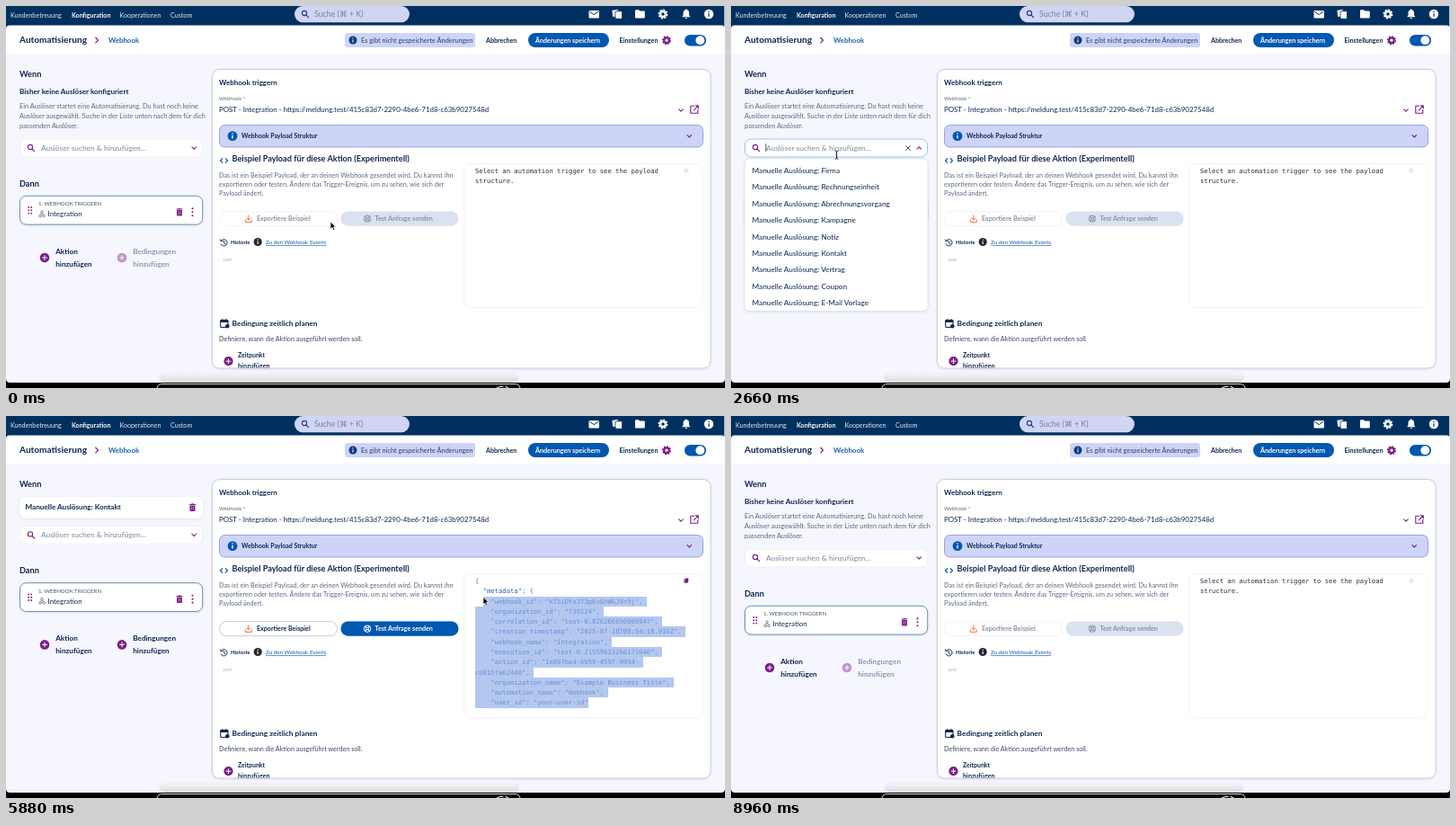
These frames come from a looping animation (800x425 px, 9030 ms). An HTML page:

```html
<!DOCTYPE html>
<html lang="de">
<head>
<meta charset="utf-8">
<title>Automatisierung</title>
<style>
  html, body { margin: 0; width: 100%; height: 100%; overflow: hidden; background: #000; }
  svg { display: block; width: 800px; height: 425px; }
  text { font-family: Lato, "Open Sans", sans-serif; }
  .mono { font-family: "DejaVu Sans Mono", "Liberation Mono", monospace; font-size: 7.21px; }
</style>
</head>
<body>
<svg id="stage" viewBox="0 0 800 425" xmlns="http://www.w3.org/2000/svg"></svg>
<script>
const LOOP = 9030, STEP = 70;
const NAVY = '#0f2650', BLUE = '#0058b0', PLUM = '#7d1f85', GREY = '#5d6880', SOFT = '#8791a6';
const CHAR = 4.34, LINE = 11.28, CODE_X = 522, CODE_TOP = 178;
const T = { open: 2520, pick: 3990, load: 4200, drag: 4970, blur: 5040, dragEnd: 5670, remove: 7210, fade: 250 };

// ---- drawing helpers ----
const text = (x, y, size, str, fill = NAVY, bold = false, extra = '') =>
  `<text x="${x}" y="${y}" font-size="${size}" fill="${fill}" ${bold ? 'font-weight="700"' : ''} ${extra}>${str}</text>`;
const box = (x, y, x2, y2, r, fill, stroke = 'none', extra = '') =>
  `<rect x="${x}" y="${y}" width="${x2 - x}" height="${y2 - y}" rx="${r}" fill="${fill}" stroke="${stroke}" ${extra}/>`;
const dot = (x, y, r, fill) => `<circle cx="${x}" cy="${y}" r="${r}" fill="${fill}"/>`;
const line = (d, color, w = 1, extra = '') =>
  `<path d="${d}" fill="none" stroke="${color}" stroke-width="${w}" stroke-linecap="round" stroke-linejoin="round" ${extra}/>`;
const group = (id, body, extra = '') => `<g id="${id}" ${extra}>${body}</g>`;

const chevron = (x, y, extra = '') => line(`M${x - 2.3} ${y - 1.2}l2.3 2.4l2.3 -2.4`, PLUM, 1.1, extra);
const lens = (x, y, c) =>
  `<circle cx="${x - 1}" cy="${y - 1}" r="2.6" fill="none" stroke="${c}" stroke-width="1.1"/>` + line(`M${x + 1} ${y + 1}l2.6 2.6`, c, 1.2);
const info = (x, y, r, c, mark = '#fff') =>
  dot(x, y, r, c) + line(`M${x} ${y - .3}v${r * .5}`, mark, r * .24) + dot(x, y - r * .48, r * .15, mark);
const plus = (x, y, r = 5.3) => dot(x, y, r, PLUM) + line(`M${x - 2.4} ${y}h4.8M${x} ${y - 2.4}v4.8`, '#fff', 1);
const trash = (x, y) =>
  `<path d="M${x - 3.4} ${y - 3.7}h2l.6 -.7h1.600l.6 .7h2v1h-6.800zM${x - 3} ${y - 2.300}h6v5.600a1 1 0 0 1 -1 1h-4a1 1 0 0 1 -1 -1z" fill="${PLUM}"/>` +
  line(`M${x - 1} ${y - .7}v3.2M${x + 1} ${y - .7}v3.2`, '#e9cbe9', .5);
const gear = (x, y, r, c) =>
  `<circle cx="${x}" cy="${y}" r="${r * .56}" fill="none" stroke="${c}" stroke-width="${r * .46}"/>
   <circle cx="${x}" cy="${y}" r="${r * .86}" fill="none" stroke="${c}" stroke-width="${r * .3}" pathLength="80" stroke-dasharray="6 4"/>`;
const wheel = (x, y, c) =>
  `<circle cx="${x}" cy="${y}" r="3.7" fill="none" stroke="${c}"/><circle cx="${x}" cy="${y}" r="1.4" fill="none" stroke="${c}" stroke-width=".9"/>` +
  line([[1, 1], [1, -1], [-1, 1], [-1, -1]].map(([a, b]) => `M${x + a} ${y + b}l${a * 1.6} ${b * 1.6}`).join(''), c, 1.1);

// ---- page content ----
const json = [
  '{', '  "metadata": {',
  '    "webhook_id": "kT5iDYx373p6v6hWGJVn9j",',
  '    "organization_id": "739224",',
  '    "correlation_id": "test-0.826366690009047",',
  '    "creation_timestamp": "2025-07-18T08:54:18.916Z",',
  '    "webhook_name": "Integration",',
  '    "execution_id": "test-0.21559623266171646",',
  '    "action_id": "1e897ba4-6b59-459f-9954-',
  'cd815fa62440",',
  '    "organization_name": "Example Business Title",',
  '    "automation_name": "Webhook",',
  '    "user_id": "your-user-id"'
];
const triggers = ['Firma', 'Rechnungseinheit', 'Abrechnungsvorgang', 'Kampagne', 'Notiz',
  'Kontakt', 'Vertrag', 'Coupon', 'E-Mail Vorlage'];
const ROW = 18.4, LIST_TOP = 174;

const mono = (str, i, fill) => {
  const pad = str.length - str.trimStart().length;
  return `<text class="mono" x="${CODE_X + pad * CHAR}" y="${186 + i * LINE}" fill="${fill}">` +
    str.trim().replace('{', '<tspan fill="#66748c">{</tspan>') + '</text>';
};

const navIcons = () => {
  const w = '#fff', n = '#00305f';
  return box(648.5, 5, 660, 13.5, 1.2, w) + line('M649.5 6.4l4.7 3.2l4.8 -3.2', n, 1) +
    box(674.5, 4, 681.5, 12, 1, w, n, 'stroke-width=".6" transform="rotate(-8 678 8)"') +
    box(678, 5.8, 685.5, 14.2, 1, w, n, 'stroke-width=".8"') +
    '<path d="M700 5.2q0-1 1-1h3l1.2 1.4h4.6q1 0 1 1v6q0 1-1 1h-8.800q-1 0-1-1z" fill="#fff"/>' +
    gear(731, 9, 5.4, w) +
    '<path d="M752.500 12.200v-.8l1-1v-2.900q0-2.700 2.500-3.300q.1-.9.800-.9t.8.900q2.500.6 2.500 3.300v2.900l1 1v.8zM755.600 12.900h2.400q-.2 1.200-1.200 1.200t-1.200-1.200z" fill="#fff"/>' +
    info(782, 9, 5.2, w, n);
};

const shell = () =>
  `<path d="M0 0H800V414.500q0 4.500-4.500 4.500H4.500Q0 419 0 414.500z" fill="#f5f6fe"/>` +
  box(170, 407, 571, 419, 9, 'url(#shade)') +
  box(0, 0, 800, 30, 0, '#00305f') + box(799, 0, 800, 30, 0, '#b4c0d2') +
  '<path d="M0 53V25.500q0-4 4-4H796q4 0 4 4V53z" fill="#fff"/>' +
  `<path d="M168 427v-1q0-5.500 6-5.500H566q6 0 6 5.500v1" fill="#080808" stroke="#dcdcdc"/>` +
  line('M546 425l4-1.500h3M556 423.500l3 1.500', '#ddd', 1.2) +
  text(5, 12.5, 7.18, 'Kundenbetreuung', '#e3eaf3') +
  text(73, 12.5, 7.1, 'Konfiguration', '#fff', true) +
  text(126.5, 12.5, 7.05, 'Kooperationen', '#e3eaf3') +
  text(183, 12.5, 7.15, 'Custom', '#e3eaf3') +
  box(321, 0, 449, 18.2, 9.1, '#cfd5f2') +
  lens(333, 9, '#1e3f86') + text(343, 12, 8.8, 'Suche (⌘ + K)', '#7481a0') + navIcons();

const header = () =>
  text(15, 41.2, 10.1, 'Automatisierung', NAVY, true) +
  line('M99.800 35.300l2.700 2.800l-2.700 2.800', PLUM, 1.3) +
  text(114, 41, 7.87, 'Webhook', '#1a62ae', true) +
  box(377, 30, 522, 46, 3, '#cdd4f6') + info(386, 38, 4.5, '#123a7c') +
  text(395, 40.8, 7.38, 'Es gibt nicht gespeicherte Änderungen', '#2a3f6c') +
  text(534, 40.6, 7.06, 'Abbrechen', NAVY, true) +
  box(581, 30, 671, 46, 8, BLUE) + text(589, 40.6, 7.2, 'Änderungen speichern', '#fff', true) +
  text(682.5, 40.6, 7.2, 'Einstellungen', NAVY, true) + gear(735, 38.2, 5, PLUM) +
  box(755, 32, 779, 44.5, 6.2, BLUE) + dot(772.3, 38.2, 4.9, '#fff');

const intro = () =>
  text(15, 98, 8.15, 'Bisher keine Auslöser konfiguriert', NAVY, true) +
  ['Ein Auslöser startet eine Automatisierung. Du hast noch keine',
   'Auslöser ausgewählt. Suche in der Liste unten nach dem für dich',
   'passenden Auslöser.'].map((s, i) => text(15, 113.8 + i * 11.2, 7.37, s, GREY)).join('');

const chip = () =>
  box(15, 90, 219, 113.5, 6, '#fff', 'none', 'filter="url(#soft)"') +
  text(21.5, 104.3, 8.18, 'Manuelle Auslösung: Kontakt', NAVY, true) + trash(207.5, 101.7);

const steps = () => {
  let grip = '';
  for (let i = 0; i < 6; i++) grip += dot(25.2 + (i % 2) * 3, 224 + (i >> 1) * 3.3, .95, PLUM);
  const add = (x, label) => plus(x, 280) + text(x + 12.2, 275.6, 8.2, label, NAVY, true) +
    text(x + 12.2, 289.6, 8.2, 'hinzufügen', NAVY, true);
  return box(15.5, 148, 218.5, 168, 7, '#fff', '#eceef6', 'id="field" stroke-width=".9"') +
    lens(28, 158, PLUM) + text(39, 160.5, 8.38, 'Auslöser suchen &amp; hinzufügen...', '#7b879c') +
    chevron(209.2, 158, 'id="arrow"') +
    group('focus', line('M38.800 153.500v8', NAVY, .8, 'id="caret"') + line('M194.700 155.700l4.800 4.800m0 -4.800l-4.800 4.800', NAVY, .9)) +
    text(15, 200.5, 9.2, 'Dann', NAVY, true) +
    box(15.5, 211.3, 218.7, 243.1, 7, '#fff', '#6c8fb4', 'filter="url(#soft)"') + grip +
    text(36, 222.3, 6.1, '1. WEBHOOK TRIGGERN', '#43506c') +
    line('M40 229.500l-1.800 3.600M40 229.500l2 3.600M38 233.400h4', '#66718a', .8) +
    [[40, 229.3], [38, 233.4], [42.3, 233.4]].map(([x, y]) => `<circle cx="${x}" cy="${y}" r="1.3" fill="#fff" stroke="#66718a" stroke-width=".8"/>`).join('') +
    text(46.5, 234.3, 7.95, 'Integration') + trash(193, 229.3) +
    [225.4, 229.3, 233.2].map(y => dot(207.5, y, 1.05, PLUM)).join('') +
    add(43, 'Aktion') + group('conditions', add(129, 'Bedingungen'));
};

const card = () =>
  box(229.5, 70.5, 784, 403, 8, '#fff', '#c9cfdf', 'filter="url(#soft)"') +
  text(237, 88, 8, 'Webhook triggern', NAVY, true) +
  text(237, 105.2, 5.9, 'Webhook *', GREY) +
  text(237, 118, 7.9, 'POST - Integration - https://meldung.test/415c83d7-2290-4be6-71d8-c63b9027548d') +
  chevron(751, 116) +
  line('M765.500 111.300h-3.700v8h8v-3.700M767.300 110.900h3v3M770 111.200l-4.600 4.600', PLUM, 1.1) +
  box(237.5, 132.5, 775.5, 157, 6, '#cdd4f8', '#98a3de') + info(252, 144.6, 5.4, BLUE) +
  text(262, 147.1, 7.02, 'Webhook Payload Struktur', NAVY, true) + chevron(760.3, 144.8) +
  line('M240.800 169.700l-2.300 2.300l2.300 2.300M244.200 169.700l2.300 2.300l-2.300 2.300', BLUE, 1.1) +
  text(251.5, 173.2, 9.19, 'Beispiel Payload für diese Aktion (Experimentell)', NAVY, true) +
  ['Das ist ein Beispiel Payload, der an deinen Webhook gesendet wird. Du kannst ihn',
   'exportieren oder testen. Ändere das Trigger-Ereignis, um zu sehen, wie sich der',
   'Payload ändert.'].map((s, i) => text(237, 190.6 + i * 10.4, 7.28, s, GREY)).join('') +
  box(509.5, 175.5, 775, 335.5, 7, '#fff', '#f1f2f7', 'stroke-width=".8"') +
  group('copy', box(754.3, 181.2, 758, 186, .6, '#a95cae') + box(755.6, 180.6, 759.3, 185.2, .6, PLUM)) +
  // buttons
  box(237.5, 228.5, 368.5, 244.7, 8, '#fff', '#f2f3f8') +
  box(237.5, 228.5, 368.5, 244.7, 8, 'none', '#c8cfdf', 'id="outline"') +
  line('M269.800 233v4.800m-2.200 -2l2.200 2.200l2.200 -2.200M266.300 238v2.300h7v-2.300', '#f0703a', 1) +
  text(279, 239.3, 7.1, 'Exportiere Beispiel', NAVY, true, 'id="export"') +
  box(372.5, 228.5, 503.5, 244.7, 8, '#dae1ef') + box(372.5, 228.5, 503.5, 244.7, 8, BLUE, 'none', 'id="fill"') +
  group('iconOn', wheel(402, 236.7, '#fff')) + group('iconOff', wheel(402, 236.7, SOFT)) +
  text(410.5, 239.3, 7.15, 'Test Anfrage senden', '#fff', true, 'id="send"') +
  // history
  line('M239.300 261.200a3.700 3.700 0 1 1 -.3 3.600M238.400 259.800l.7 2l2 -.4M242.600 261.600v2.300l1.600 1', NAVY, .9) +
  text(250, 265.4, 6, 'Historie', NAVY, true) + info(280.2, 262.5, 4.6, '#25282f') +
  text(289, 265.4, 6.28, 'Zu den Webhook Events', '#1259ae', false, 'text-decoration="underline"') +
  text(241.5, 284, 5.2, 'Leer', '#a9b0bf') +
  // schedule
  box(238.7, 349.5, 247, 357.5, 1, 'none', NAVY, 'stroke-width="1.1"') + box(238.5, 349, 247.2, 352, .8, NAVY) +
  line('M240.800 348.300v1M245 348.300v1', NAVY, 1) + dot(246.3, 356.3, 2.3, NAVY) +
  text(251.5, 355.8, 8.36, 'Bedingung zeitlich planen', NAVY, true) +
  text(237, 373.4, 7.23, 'Definiere, wann die Aktion ausgeführt werden soll.', '#3a4763') +
  `<g clip-path="url(#cut)">` + plus(247.5, 395.2, 5.1) +
  text(258, 390.8, 6.95, 'Zeitpunkt', NAVY, true) + text(258, 403.4, 7.2, 'hinzufügen', NAVY, true) + '</g>' +
  // payload; the selection lies over the text and lightens it
  group('empty', mono('Select an automation trigger to see the payload', 0, '#27303f') + mono('structure.', 1, '#27303f')) +
  group('payload', json.map((s, i) => mono(s, i, '#2163b3')).join('')) +
  group('marks', json.map(() => `<rect height="${LINE}" fill="#8daae8"/>`).join(''), 'opacity=".65" shape-rendering="crispEdges"');

const menu = () =>
  box(15, 170, 219, 339.5, 5, '#fff', '#d9dde8', 'stroke-width=".7" filter="url(#soft)"') +
  `<rect id="hover" x="15.500" width="203" height="${ROW + .4}" fill="#eff1f8"/>` +
  triggers.map((s, i) => text(23.5, 186 + i * ROW, 8.28, 'Manuelle Auslösung: ' + s)).join('');

const pointer = () =>
  group('arrowTip', `<path d="M0 0v8.200l1.900-1.700l1.300 2.900l1.500-.7l-1.300-2.800h2.600z" fill="#000" stroke="#fff" stroke-width=".7"/>`) +
  group('hand', `<path d="M0 .8q0-1 .8-1t.8 1v3l3.300.7q1.500.4 1.300 1.900l-.5 3.200h-4.500l-2.900-3.500q-.3-1 .7-.9l1 .8z" fill="#fff" stroke="#111" stroke-width=".8"/>`) +
  group('beam', line('M-1.500 -4.500q1.500 0 1.500 1v7q0 1 -1.500 1M1.500 -4.500q-1.500 0 -1.500 1v7q0 1 1.500 1', '#111', .8));

document.getElementById('stage').innerHTML =
  `<defs>
    <linearGradient id="shade" x1="0" y1="0" x2="0" y2="1"><stop offset="0" stop-color="#eeeef2" stop-opacity=".3"/><stop offset="1" stop-color="#d8d8da"/></linearGradient>
    <filter id="soft" x="-5%" y="-10%" width="110%" height="125%"><feDropShadow dx="0" dy=".8" stdDeviation="1.300" flood-color="#44517f" flood-opacity=".15"/></filter>
    <clipPath id="cut"><rect x="230" y="380" width="550" height="22.500"/></clipPath>
  </defs>` +
  shell() + header() + text(15, 79, 9.2, 'Wenn', NAVY, true) +
  group('intro', intro()) + group('chip', chip()) + group('steps', steps()) + card() +
  group('menu', menu()) + group('pointer', pointer());

// ---- motion ----
const $ = id => document.getElementById(id);
const show = (id, on) => { $(id).style.display = on ? '' : 'none'; };
const clamp = v => Math.min(1, Math.max(0, v));
const marks = [...$('marks').children];

// time, x, y
const path = [
  [0, 361, 240], [420, 230, 165], [630, 230, 165], [840, 165, 112], [980, 165, 112],
  [1330, 140, 132], [1750, 140, 132], [2380, 118, 158], [2520, 118, 158], [3360, 112, 262],
  [3430, 112, 262], [3710, 116, 273], [3990, 116, 273], [4830, 667, 322], [T.drag, 667, 322],
  [T.dragEnd, 531, 201.5], [5880, 531, 201.5], [6720, 212, 107], [6790, 212, 107], [7070, 203, 101],
  [7560, 203, 101], [8540, 420, -14], [LOOP, 420, -14]
];

function pointerAt(t) {
  const i = path.findIndex(p => p[0] > t);
  const [t0, x0, y0] = path[i - 1], [t1, x1, y1] = path[i];
  const k = (t - t0) / (t1 - t0), e = k * k * (3 - 2 * k);
  return [x0 + (x1 - x0) * e, y0 + (y1 - y0) * e];
}

function drawMarks(t) {
  const active = t > T.drag && t < T.remove;
  show('marks', active);
  if (!active) return;
  const [x, y] = pointerAt(Math.min(t, T.dragEnd));
  const first = Math.floor((y - CODE_TOP) / LINE);
  const snap = CODE_X + Math.max(0, Math.floor((x - CODE_X) / CHAR)) * CHAR;
  marks.forEach((m, i) => {
    const lineBreak = i < json.length - 1 ? 1 : 0;
    const end = CODE_X + (json[i].length + lineBreak) * CHAR;
    const from = i === first ? Math.min(end, snap) : CODE_X;
    m.setAttribute('x', from);
    m.setAttribute('y', CODE_TOP + i * LINE);
    m.setAttribute('width', i < first ? 0 : end - from);
  });
}

function draw(now) {
  const t = Math.floor((now % LOOP) / STEP) * STEP;
  const [x, y] = pointerAt(t);
  const open = t >= T.open && t < T.pick;
  const focused = t >= T.open && t < T.blur;
  const chosen = t >= T.pick && t < T.remove;
  const loaded = t >= T.load && t < T.remove;

  show('intro', !chosen);
  show('chip', chosen);
  $('steps').setAttribute('transform', `translate(0 ${chosen ? -25.6 : 0})`);
  $('conditions').setAttribute('opacity', chosen ? 1 : .45);

  show('focus', focused);
  show('caret', (t - T.open) % 1060 < 530);
  $('field').setAttribute('stroke', focused ? '#94bfe2' : '#eceef6');
  $('arrow').setAttribute('transform', open ? 'rotate(180 209.2 158)' : '');
  show('menu', open);
  const row = Math.floor((y - LIST_TOP) / ROW);
  show('hover', row >= 0);
  $('hover').setAttribute('y', LIST_TOP + row * ROW);

  const enabled = clamp((t - T.pick) / T.fade) - clamp((t - T.remove) / T.fade);
  $('fill').setAttribute('opacity', enabled);
  $('outline').setAttribute('opacity', enabled);
  $('export').setAttribute('fill', chosen ? NAVY : SOFT);
  $('send').setAttribute('fill', chosen ? '#fff' : SOFT);
  show('iconOn', chosen);
  show('iconOff', !chosen);

  show('empty', !loaded);
  show('payload', loaded);
  $('copy').setAttribute('opacity', loaded ? 1 : .12);
  drawMarks(t);

  const hand = (open && y > 170) || (t >= 6720 && t < T.remove);
  const beam = !hand && t > 1750 && t < T.pick && y > 148;
  show('hand', hand);
  show('beam', beam);
  show('arrowTip', !hand && !beam);
  $('pointer').setAttribute('transform', `translate(${x} ${y})`);
}

function tick() {
  draw(performance.now());
  requestAnimationFrame(tick);
}
tick();
</script>
</body>
</html>
```
